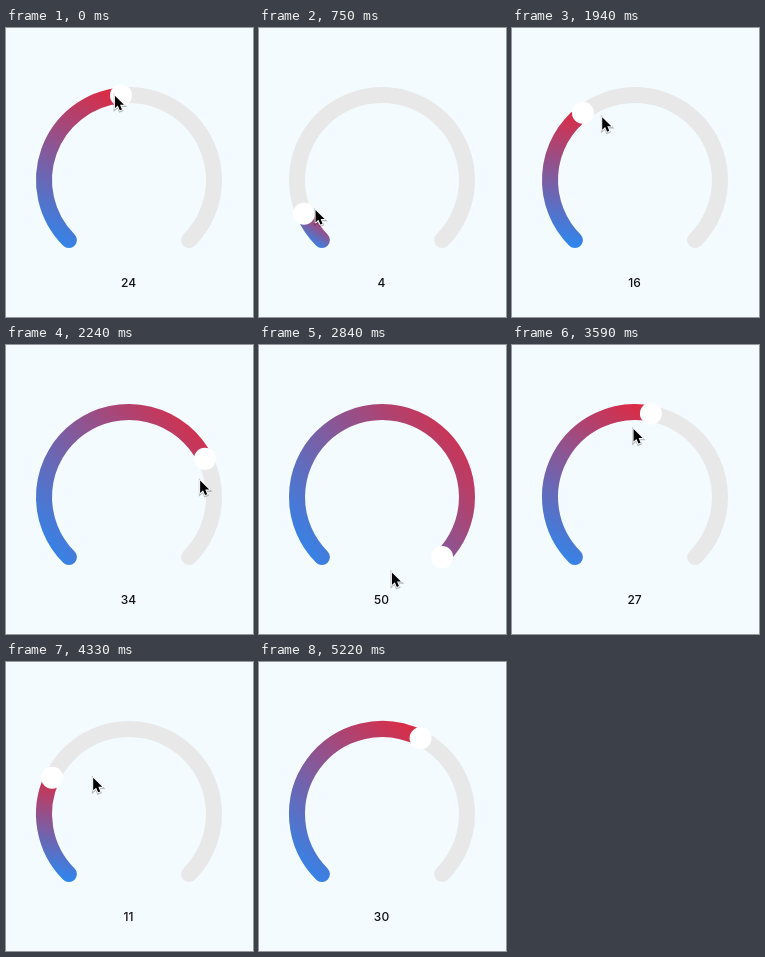
These frames come from a looping animation (247x289 px, 5520 ms). An HTML page:

```html
<!DOCTYPE html>
<html lang="en">
<head>
<meta charset="utf-8">
<title>Arc slider</title>
<style>
  html, body { margin: 0; width: 100%; height: 100%; overflow: hidden; background: #f3fbff; }
  svg { display: block; width: 247px; height: 289px; }
  .arc { fill: none; stroke-width: 16; stroke-linecap: round; }
  text { font: 500 12px Inter, "Liberation Sans", sans-serif; fill: #111; text-anchor: middle; }
</style>
</head>
<body>
<svg viewBox="0 0 247 289">
  <defs>
    <linearGradient id="heat" gradientUnits="userSpaceOnUse">
      <stop offset="0" stop-color="#2f86ee"/>
      <stop offset="1" stop-color="#de2a42"/>
    </linearGradient>
    <path id="arrow" d="M0 0V14.2L3.3 11.2L5.6 16.5L8 15.5L5.8 10.3H10.3Z"/>
  </defs>
  <path id="track" class="arc" stroke="#e8e8e8"/>
  <path id="fill" class="arc" stroke="url(#heat)"/>
  <circle id="knob" r="11" fill="#fff"/>
  <text id="label" x="122.5" y="258.5"></text>
  <g id="cursor">
    <g transform="translate(.5 1) scale(.88)">
      <use href="#arrow" y="1" fill="none" stroke="#000" stroke-opacity=".25" stroke-width="3"/>
      <use href="#arrow" stroke="#fff" stroke-width="2" stroke-linejoin="round" paint-order="stroke"/>
    </g>
  </g>
</svg>
<script>
const LOOP = 5520, CX = 123, CY = 152, R = 85, MAX = 50;
const LAST = 36, RELEASE = 34, HIDE = 35, LAG = 0.5;
const EXIT = [196, 249];

// Turning points of the drag: step, value aimed at (may pass the end of the arc).
const aim = spline([
  [1, 24], [1.5, 23.2], [4.5, 4], [6.5, 4], [12.5, 16], [13, 18], [13.5, 19.9], [14, 30.5],
  [18.5, 51], [19.5, 57], [21, 39], [23.4, 27.3], [24, 27], [24.5, 24.7],
  [27, 6], [28.5, 11], [29, 13], [29.5, 16.8], [33.5, 30]
]);
// Step, distance of the pointer from the centre.
const reach = spline([[1, 86.5], [5, 73], [13, 72], [19, 75], [24, 69], [29, 52], [33, 70]]);

// Smooth curve through the keys that never overshoots them.
function spline(keys) {
  const slope = i => (keys[i + 1][1] - keys[i][1]) / (keys[i + 1][0] - keys[i][0]);
  const tangent = i => {
    if (i === 0 || i === keys.length - 1) return 0;
    const a = slope(i - 1), b = slope(i);
    return a * b > 0 ? 2 * a * b / (a + b) : 0;
  };
  return x => {
    if (x <= keys[0][0]) return keys[0][1];
    const i = keys.findIndex(k => k[0] >= x) - 1;
    if (i < 0) return keys[keys.length - 1][1];
    const [x0, y0] = keys[i], [x1, y1] = keys[i + 1];
    const h = x1 - x0, p = (x - x0) / h, q = 1 - p;
    return y0 * q * q * (1 + 2 * p) + y1 * p * p * (3 - 2 * p)
      + h * p * q * (tangent(i) * q - tangent(i + 1) * p);
  };
}

const $ = id => document.getElementById(id);
const startOf = n => 150 * n - 10 * ((n >= 11) + (n >= 25) + (n >= 35));
const angle = v => 135 + 270 * v / MAX;
const clamp = v => Math.min(MAX, v);

function point(deg, r = R) {
  const a = deg * Math.PI / 180;
  return [CX + r * Math.cos(a), CY + r * Math.sin(a)];
}

function set(id, attrs) {
  for (const k in attrs) $(id).setAttribute(k, attrs[k]);
}

function arc(v) {
  const big = angle(v) > 315 ? 1 : 0;
  return `M${point(135)}A${R} ${R} 0 ${big} 1 ${point(angle(v))}`;
}

// The gradient runs corner to corner over the filled arc's own box.
function fitGradient(v) {
  const end = angle(v);
  const pts = [135, 180, 270, 360, end].filter(d => d <= end).map(d => point(d));
  const xs = pts.map(p => p[0]), ys = pts.map(p => p[1]);
  set("heat", { x1: Math.min(...xs), y1: Math.max(...ys), x2: Math.max(...xs), y2: Math.min(...ys) });
}

function draw(t) {
  let n = 1;
  while (n < LAST && startOf(n + 1) <= t) n++;
  // The knob trails the pointer, and the number trails the knob.
  const v = clamp(aim(n));
  const [cx, cy] = point(angle(v));
  const tip = n < RELEASE ? point(angle(aim(n + LAG)), reach(n)) : EXIT;
  fitGradient(v);
  set("fill", { d: arc(v) });
  set("knob", { cx, cy });
  $("label").textContent = Math.round(clamp(aim(n - LAG)));
  set("cursor", {
    transform: `translate(${tip})`,
    visibility: n >= HIDE ? "hidden" : "visible"
  });
}

set("track", { d: arc(MAX) });
const t0 = performance.now();
function tick() {
  draw((performance.now() - t0) % LOOP);
  requestAnimationFrame(tick);
}
tick();
</script>
</body>
</html>
```
